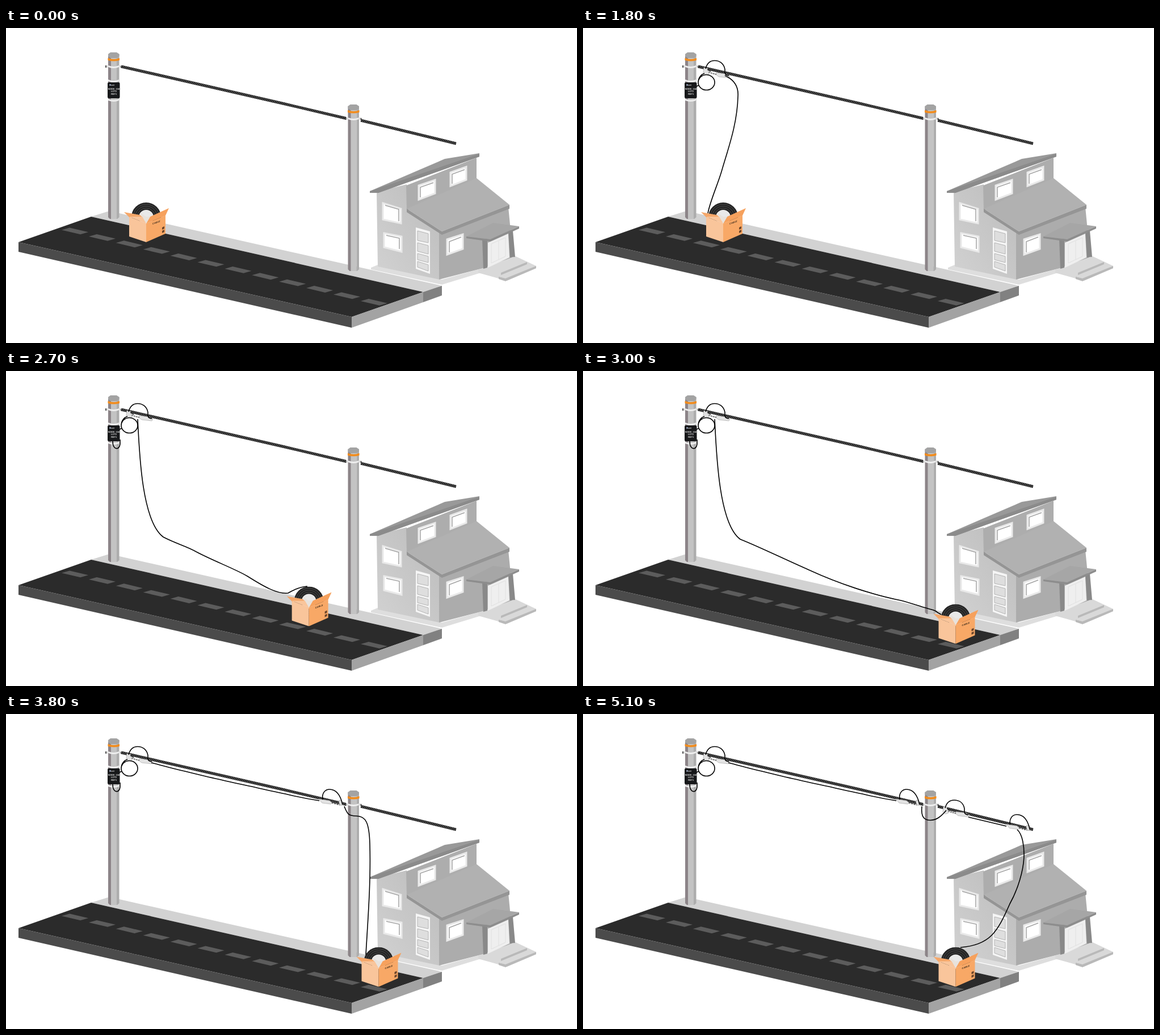
An HTML page without scripts for the animation above (10000 ms loop, 1006x556 px).

```html
<!DOCTYPE html>
<html lang="en">
<head>
<meta charset="utf-8">
<title>Aerial cable installation</title>
<style>
html, body { margin: 0; width: 100%; height: 100%; overflow: hidden; background: #fff; }
svg { display: block; width: 100vw; height: 100vh; }
text { font-family: "Liberation Sans", Arial, sans-serif; }

.cable { fill: none; stroke: #000; stroke-width: 1.6; }
.grow { stroke-dasharray: 1 2; }
.grow, .box, .span, .drop, .show { animation: 10s linear infinite; }

/* one step per 100 ms = 1% of the loop */
.span { animation-name: rise, span; }
.loop { animation-name: loop; }
.coil { animation-name: coil; }
.drip { animation-name: drip; }
.drop { animation-name: drop, at30; animation-timing-function: linear, step-end; }
.box { animation-name: box; }
.show { animation-timing-function: step-end; }
.near { animation-name: at8; }
.mid { animation-name: at33; }
.past { animation-name: at40; }
.far { animation-name: at49; }
.taut { animation-name: at50; }

@keyframes at8 { 0% { visibility: hidden } 8%, 100% { visibility: visible } }
@keyframes at30 { 0% { visibility: hidden } 30%, 100% { visibility: visible } }
@keyframes at33 { 0% { visibility: hidden } 33%, 100% { visibility: visible } }
@keyframes at40 { 0% { visibility: hidden } 40%, 100% { visibility: visible } }
@keyframes at49 { 0% { visibility: hidden } 49%, 100% { visibility: visible } }
@keyframes at50 { 0% { visibility: hidden } 50%, 100% { visibility: visible } }

@keyframes rise { 0% { stroke-dashoffset: -1.01; animation-timing-function: steps(7) } 7%, 100% { stroke-dashoffset: 0 } }
@keyframes loop { 0%, 7% { stroke-dashoffset: 1.01; animation-timing-function: steps(4) } 11%, 100% { stroke-dashoffset: 0 } }
@keyframes coil { 0%, 11% { stroke-dashoffset: 1.01; animation-timing-function: steps(7) } 18%, 100% { stroke-dashoffset: 0 } }
@keyframes drip { 0%, 18% { stroke-dashoffset: 1.01; animation-timing-function: steps(2) } 20%, 100% { stroke-dashoffset: 0 } }

@keyframes box {
  0%, 20% { transform: translate(0, 0); animation-timing-function: steps(10) }
  30%, 100% { transform: translate(409.5px, 103.5px) }
}
@keyframes span {
  0%, 20% { d: path("M250 84C268 92 274 104 273 120C272 170 255 215 245 250C238 275 224 305 220 327C220 327 220 327 220 327C220 327 220 327 220 327"); animation-timing-function: steps(3) }
  23% { d: path("M229 77C246 108 270 170 271 212C274 226 285 240 290 255C302 268 312 295 316 306C324 325 335 342 343 359C343 359 343 359 343 359"); animation-timing-function: steps(4) }
  27% { d: path("M232 85C235 150 240 265 277 293C300 305 320 310 335 319C365 335 405 350 425 362C455 381 478 394 497 392C510 384 520 381 531 380"); animation-timing-function: steps(3) }
  30% { d: path("M232 85C235 150 240 270 277 297C310 310 350 330 400 352C450 375 510 395 560 405C575 409 590 414 600 417C604 418 607 419 610 420"); animation-timing-function: steps(4) }
  34% { d: path("M232 85C235 150 243 280 277 298C300 306 390 308 440 299C465 295 484 291 490 288C530 270 545 200 562 172C568 162 575 160 583 158"); animation-timing-function: steps(4) }
  38%, 100% { d: path("M256 86C276 91 296 97 315 101C335 106 355 111 374 115C394 120 414 124 433 128C453 133 473 137 492 141C512 146 532 150 552 153") }
}
@keyframes drop {
  0%, 30% { d: path("M610 420C615 421 618 422 620 423C622 424 624 426 626 427C628 428 630 429 631 430"); animation-timing-function: steps(4) }
  34% { d: path("M588 160C599 166 600 176 599 190C597 205 586 225 587 243C589 275 612 345 631 430"); animation-timing-function: steps(4) }
  38% { d: path("M596 163C601 176 603 180 617 180C634 180 640 192 641 230C643 300 637 370 634 425"); animation-timing-function: steps(3) }
  41%, 47% { d: path("M678 181C688 190 690 215 686 245C680 300 640 370 634 425"); animation-timing-function: steps(4) }
  51%, 100% { d: path("M765 204C775 213 777 235 777 248C777 275 766 310 752 335C730 385 717 408 665 412") }
}
</style>
</head>
<body>
<svg viewBox="0 0 1006 556">
  <defs>
    <pattern id="twist" width="3" height="6" patternUnits="userSpaceOnUse" patternTransform="rotate(13)">
      <path d="M0 0H3V6H0z" fill="#111"/>
      <path d="M-1 6L2 0M2 6L5 0" stroke="#bbb" stroke-width=".7"/>
    </pattern>
    <linearGradient id="wall" x1="0" y1="1" x2="1" y2="0">
      <stop stop-color="#d2d2d2"/><stop offset="1" stop-color="#bcbcbc"/>
    </linearGradient>
    <g id="band">
      <path d="M180 0Q190 4 199 0V3Q190 7 180 3z" fill="#eee"/>
    </g>
    <g id="pole">
      <path d="M180 46H186V337H183L180 334z" fill="#8c8488"/>
      <path d="M185 50H195V337H185z" fill="#c3c3c3"/>
      <path d="M195 46H199.500V334L196 337H195z" fill="#adadad"/>
      <path d="M180 46L184 43H195L199.500 46V50L195 53H184L180 50z" fill="#a3a3a3"/>
      <path d="M179.500 53Q190 57 200 53V57Q190 60 179.500 57z" fill="#f28c1c"/>
      <path d="M176 66H180V70H176zM199 66H204V70H199z" fill="#ddd"/>
      <path d="M175 66H177V70H175zM202 67H204V70H202z" fill="#555"/>
      <use href="#band" y="66"/>
    </g>
    <g id="grip">
      <path d="M235 79L252 81L259 85L257 88L239 86L234 82z" fill="#e4e4e4" stroke="#aaa" stroke-width=".7"/>
      <path d="M221 78L235 82" stroke="#777" stroke-width="2" stroke-dasharray="3 1"/>
      <path d="M213 70L219 71L222 81L217 83L212 79z" fill="#e2e2e2" stroke="#aaa" stroke-width=".7"/>
      <path d="M219 73L225 77" stroke="#222" stroke-width="1.500"/>
    </g>
    <g id="endGrip">
      <path d="M551 150L570 153L575 157L572 159L557 157z" fill="#e4e4e4" stroke="#aaa" stroke-width=".7"/>
      <path d="M574 156L588 160" stroke="#555" stroke-width="3" stroke-dasharray="3 1.500"/>
      <path d="M586 153L591 152L594 161L588 161z" fill="#ddd" stroke="#999" stroke-width=".7"/>
      <path class="cable" d="M558 151C556 140 562 133 570 133C582 133 589 142 593 160"/>
    </g>
  </defs>

  <g id="street">
    <path d="M150 333L182 323L768 455L735 466z" fill="#d2d2d2"/>
    <path d="M150 333L735 466L609 510L22 378z" fill="#2b2b2b"/>
    <path d="M22 378L609 510V529L22 395z" fill="#4b4b4b"/>
    <path d="M609 510L735 466V484L609 529z" fill="#a3a3a3"/>
    <path d="M735 466L768 455V472L735 484z" fill="#818181"/>
    <path d="M0 0H11.700" stroke="#5c5c5c" stroke-dasharray=".69 .31" transform="matrix(47.9 11.4 -14 4 105 354.500)"/>
  </g>

  <g id="house">
    <path d="M643 423L655 418L768 444L840 424V431L768 453L643 426z" fill="#dedede"/>
    <path d="M832 427L898 403L934 420V424L882 446L832 432z" fill="#d9d9d9"/>
    <path d="M934 420V424L880 447L868 443V439L880 442zM918 413V417L872 436V432z" fill="#b9b9b9"/>
    <path d="M653 289L706 276V322L764 362V444L655 421z" fill="url(#wall)"/>
    <path d="M705 278L829 229V267L706 322z" fill="#adadad"/>
    <path d="M763 362L885 316L888 347L892 405L840 424L763 444z" fill="#acacac"/>
    <path d="M641 288L773 231L834 221V227L656 291H641z" fill="#999"/>
    <path d="M641 288L834 222V227L656 291H641z" fill="#8b8b8b"/>
    <path d="M706 319L829 265L887 312L768 359z" fill="#b1b1b1"/>
    <path d="M706 319L768 359L887 312V319L768 365L706 325z" fill="#959595"/>
    <g fill="#fff" stroke="#e9e9e9" stroke-width="3">
      <path d="M727 278L756 268V292L727 303zM783 255L811 245V268L783 279z"/>
      <path d="M664 309L696 319V345L664 338zM666 362L697 368V395L666 387z"/>
      <path d="M777 373L805 364V390L777 400z"/>
    </g>
    <g fill="none" stroke="#a2a2a2" stroke-width="1.500">
      <path d="M730 299V281L753 273M786 275V258L808 250"/>
      <path d="M668 313L692 320V341M670 366L693 371V390M781 396V377L802 369"/>
    </g>
    <path d="M722 352L747 359V434L722 425z" fill="#f5f5f5"/>
    <path d="M725 358L744 363V379L725 375zM725 379L744 384V399L725 394zM725 398L744 403V414L725 409zM725 412L744 418V429L725 422z" fill="#dedede" stroke="#b5b5b5"/>
    <path d="M849 379L885 363L887 405L849 423z" fill="#efefef"/>
    <path d="M855 381L880 370V403L855 415zM868 376V409" fill="none" stroke="#e0e0e0"/>
    <path d="M839 373L848 371V423L841 425zM885 360L893 358L897 404L888 405z" fill="#898989"/>
    <path d="M811 368L858 344L904 350L853 373z" fill="#a6a6a6"/>
    <path d="M811 368L853 373L904 350V354L853 377L811 371z" fill="#8d8d8d"/>
  </g>

  <g id="poles">
    <use href="#pole"/>
    <use href="#pole" x="422.500" y="92"/>
    <use href="#band" y="91"/>
    <use href="#band" y="125"/>
    <rect x="179" y="96" width="21.500" height="28" rx="2" fill="#17181a"/>
    <circle cx="183.500" cy="100.500" r="1.300" fill="#b9c6e6"/>
    <g fill="#ddd" font-size="4" font-weight="bold" text-anchor="middle">
      <text x="188" y="101.500" font-size="3">unit</text>
      <text x="190" y="109">NODE_104</text>
      <text x="190" y="113">LOT2</text>
      <text x="190" y="117.500">REF1</text>
    </g>
  </g>

  <path d="M203 68L489 133.500L599 159.500M625 163L793 204" fill="none" stroke="url(#twist)" stroke-width="5"/>

  <g id="hardware">
    <use class="show near" href="#grip"/>
    <use class="show mid" href="#endGrip"/>
    <g class="show past">
      <use href="#grip" x="422" y="93.500"/>
      <path class="cable" d="M597 163C595 183 602 187.500 612 187.500C622 187.500 630 182 640 170"/>
      <path class="cable" d="M679 178C671 177 672 174 672 167C670 156 662 152 654 152C645 152 640 158 638 166"/>
    </g>
    <use class="show far" href="#endGrip" x="194.500" y="44.500"/>
  </g>

  <g id="cables">
    <path class="cable grow span" pathLength="1" d="M250 84C268 92 274 104 273 120C272 170 255 215 245 250C238 275 224 305 220 327C220 327 220 327 220 327C220 327 220 327 220 327"/>
    <path class="cable grow loop" pathLength="1" d="M257 84C249 83 250 80 250 73C248 62 240 57.500 232 57.500C223 57.500 218 64 216 72"/>
    <path class="cable grow coil" pathLength="1" d="M214 80C208 82 203 88 203 96A14.500 13.500 0 1 0 232 96A14.500 13.500 0 1 0 204 101L200 103"/>
    <path class="cable grow drip" pathLength="1" d="M201 121V129C200 140 188 140 188 124"/>
    <path class="cable drop" d="M610 420C615 421 618 422 620 423C622 424 624 426 626 427C628 428 630 429 631 430"/>
    <path class="cable show taut" d="M679 182L746 198"/>
  </g>

  <g class="box">
    <path d="M217 331L236 324L281 331L247 346z" fill="#e3c3a8"/>
    <circle cx="247" cy="334" r="13" fill="#e9e9e9"/>
    <g fill="none" stroke="#555" stroke-width=".8">
      <circle cx="247" cy="334" r="19.500" stroke="#242424" stroke-width="13"/>
      <circle cx="247" cy="334" r="16"/>
      <circle cx="247" cy="334" r="19.500"/>
      <circle cx="247" cy="334" r="23"/>
    </g>
    <path d="M217 333L247 345V378L217 368z" fill="#f9c59b"/>
    <path d="M247 345L281 331V363L247 378z" fill="#f8a866"/>
    <path d="M208 325L236 330L242 335L217 334z" fill="#f5a769"/>
    <path d="M217 333L242 333L247 345z" fill="#f9c59b"/>
    <path d="M247 345L254 333L287 318L281 331z" fill="#f6a15d"/>
    <path d="M236 326L247 333L254 333L247 345z" fill="#e8e2dc"/>
    <text font-size="4" font-weight="bold" fill="#3a2a1c" transform="translate(258 347) skewY(-20)">CABLE</text>
    <path d="M275 352L279 350V354L275 356zM275 358L279 356V360L275 362z" fill="#6b452a"/>
  </g>
</svg>
</body>
</html>
```
